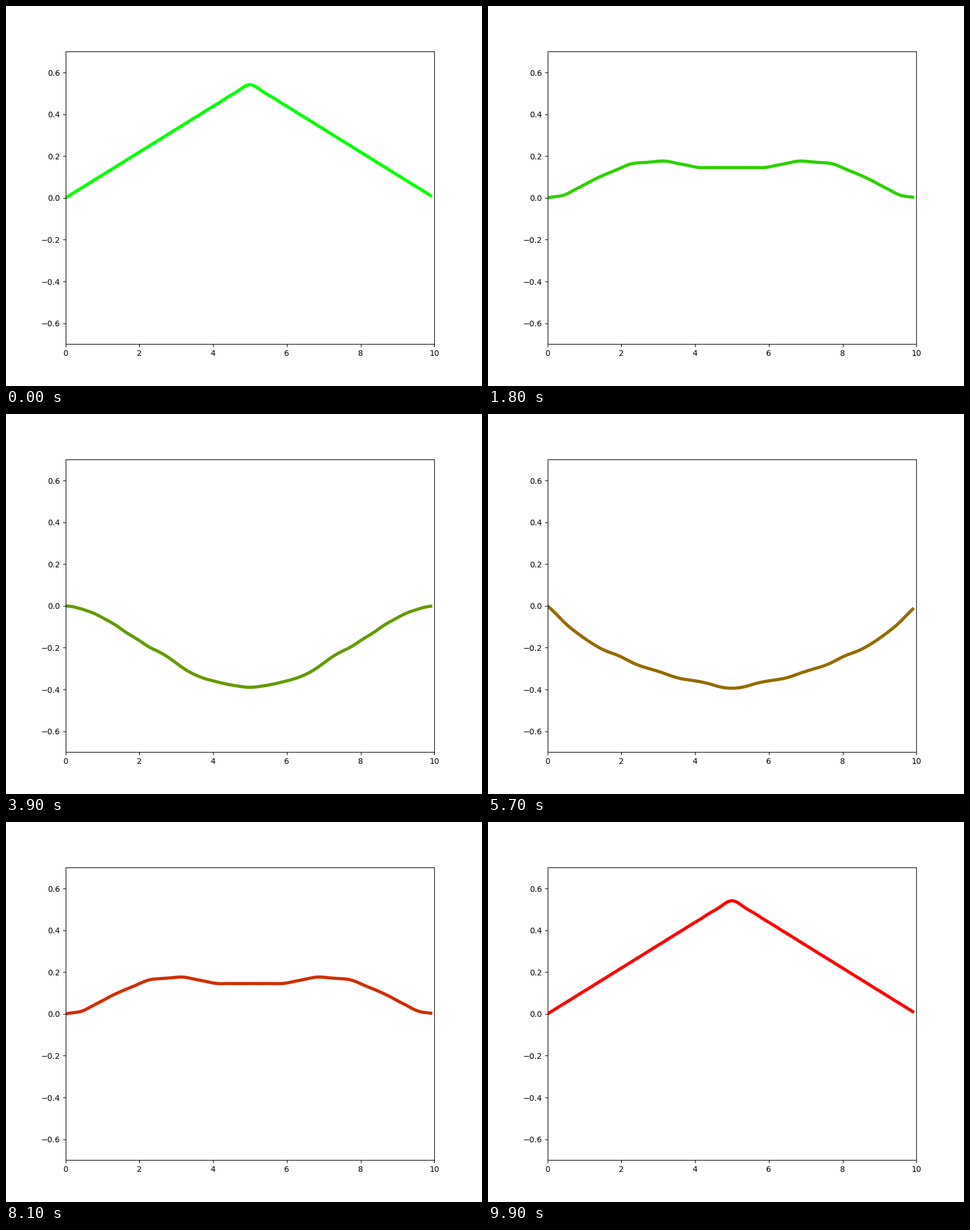
Animation, 837 px wide and 669 px high, one loop 10000 ms. Source, as a matplotlib script:

```python
import numpy as np
import matplotlib.pyplot as plt
from matplotlib.animation import FuncAnimation

W, H, DPI = 837, 669, 100
FRAMES = 100
L = 10.0          # width of the well
MODES = 40

x = np.arange(0, L, 0.1)
n = np.arange(1, MODES, 2)

# Normalised triangle expanded in the stationary states of an infinite well
coef = 4 * np.sqrt(6) / (np.pi * n) ** 2 * np.sin(n * np.pi / 2)
states = np.sqrt(2 / L) * np.sin(np.outer(n, np.pi * x / L))


def wave(u):
    """Real part of the wave function; u is the fraction of one revival."""
    return (coef * np.cos(2 * np.pi * u * n**2)) @ states


# The small margin keeps the pixel size from rounding down
fig, ax = plt.subplots(figsize=((W + 0.01) / DPI, (H + 0.01) / DPI), dpi=DPI)
ax.set_xlim(0, L)
ax.set_ylim(-0.7, 0.7)
line, = ax.plot(x, wave(0), lw=4, color=(0, 1, 0))


def update(i):
    u = i / (FRAMES - 1)
    line.set_ydata(wave(u))
    line.set_color((u, 1 - u, 0))
    return line,


anim = FuncAnimation(fig, update, frames=FRAMES, interval=100,
                     repeat=True, repeat_delay=0)
plt.show()
```
